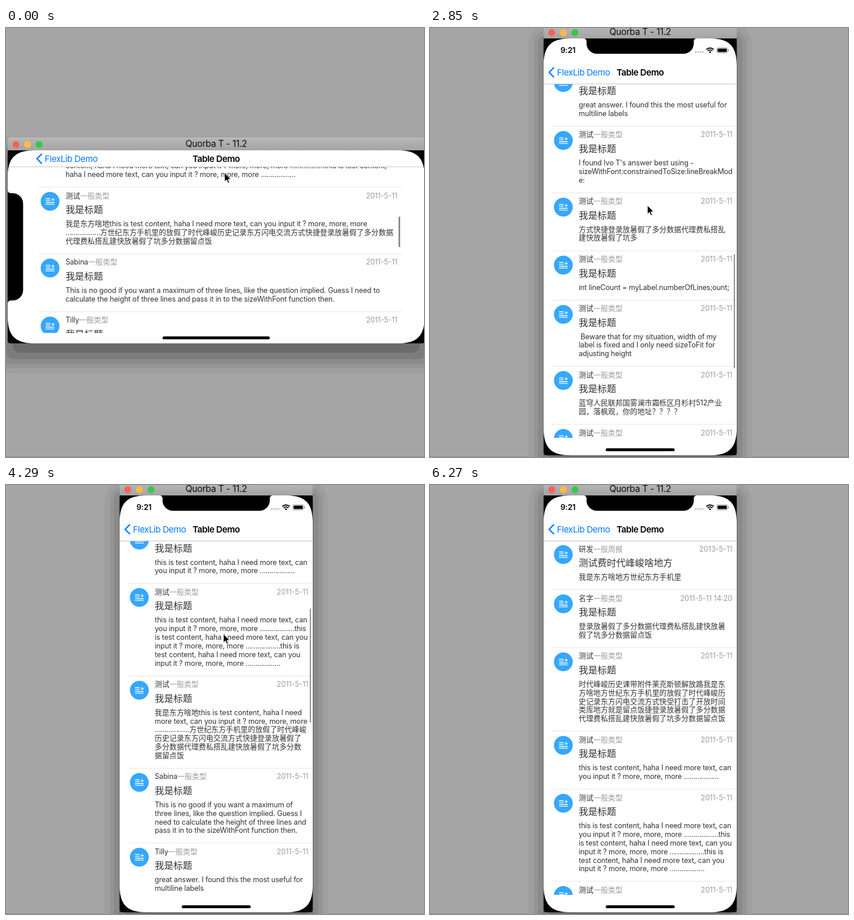
Recreate the animation shown at these times as an HTML page. Size 721 by 740 pixels, loop 6.63 s.

```html
<!DOCTYPE html>
<html lang="zh-CN">
<head>
<meta charset="utf-8">
<title>Table Demo</title>
<style>
html, body { margin: 0; width: 100%; height: 100%; overflow: hidden; background: #a5a5a5; }
body { position: relative; font: 12.43px Inter, "Noto Sans CJK SC", "Noto Sans CJK", sans-serif; letter-spacing: -.15px; color: #333; }
div, svg { position: absolute; box-sizing: border-box; white-space: pre; }
svg { overflow: visible; }
i { font-style: normal; font-size: 1.018em; letter-spacing: 0; line-height: 0; }
u { text-decoration: none; letter-spacing: -.8px; }
#floor { left: 0; right: 0; top: 739px; height: 1px; background: #8c8c8c; }
#bar { left: 0; right: 0; top: 0; height: 30px; border-radius: 5px 5px 0 0; background: linear-gradient(#b6b6b6, #a3a3a3 22px); border-top: 1px solid #c4c4c4; text-align: center; font-size: 15.5px; line-height: 20px; letter-spacing: -.35px; color: #111; }
.light { width: 12.6px; height: 12.6px; top: 4.7px; border-radius: 50%; }
#dev { background: #000; overflow: hidden; border-radius: 0 0 4px 4px; }
#view { background: #fff; overflow: hidden; }
#nav { left: 0; right: 0; top: 0; background: #fff; border-bottom: 1px solid #c6c6c6; font-size: 15.1px; letter-spacing: -.47px; }
#title { left: 0; right: 0; bottom: -1px; text-align: center; font-weight: 600; color: #000; }
#back { bottom: -1px; color: #007aff; padding-left: 15px; }
#back svg { left: 0; top: 50%; margin-top: -9.5px; }
#list { overflow: hidden; }
.row { left: 0; right: 0; }
.line { left: 14px; right: 0; bottom: 0; height: 1px; background: #e7e7e7; }
.icon { left: 34px; top: 24px; }
.name { left: 60.5px; top: 6.5px; line-height: 16px; }
.name span, .date { color: #9b9b9b; }
.date { right: 7.5px; top: 6.5px; line-height: 16px; letter-spacing: 0; }
.head { left: 60.5px; top: 29px; font-size: 15.9px; line-height: 20px; }
.body { left: 60.5px; right: 0; top: 54.5px; display: flex; align-items: center; overflow: hidden; line-height: 14.84px; }
#thumb { right: 3px; width: 2.4px; border-radius: 2px; background: #8f8f8f; }
#status, #status svg { left: 0; top: 0; }
#time { left: 29px; top: 11px; line-height: 19px; font-size: 13.4px; font-weight: 600; color: #000; letter-spacing: -.2px; }
#home { bottom: 7px; left: 50%; width: 119px; height: 5px; margin-left: -59.5px; border-radius: 3px; background: #000; }
</style>
</head>
<body>
<div id="floor"></div>
<div id="win"><div id="bar">Quorba T - 11.2</div></div>
<div id="dev">
  <div id="view">
    <div id="list"><div id="thumb"></div></div>
    <div id="nav">
      <div id="title">Table Demo</div>
      <div id="back"><svg width="12" height="19" fill="none" stroke="#007aff" stroke-width="2.4"><path d="M9.8 1 1.6 9.5 9.8 18"/></svg>FlexLib Demo</div>
    </div>
    <div id="status"><div id="time">9:21</div>
      <svg width="333" height="40">
        <path d="M262.3 23.5h0m4 0h0m4 0h0m4 0h0" stroke="#b8b8b8" stroke-width="2.8" stroke-linecap="round"/>
        <path d="M280.7 19a9.2 9.2 0 0 1 12.6 0M282.9 21.5a6 6 0 0 1 8.2 0" fill="none" stroke="#000" stroke-width="1.9"/>
        <path d="M284.9 23.4a3 3 0 0 1 4.2 0L287 25.6z"/>
        <rect x="298.5" y="16" width="19" height="9" rx="2.4" fill="none" stroke="#999"/>
        <rect x="300" y="17.5" width="16" height="6" rx="1.2"/>
        <path d="M319 19v3" stroke="#999" stroke-width="1.4"/>
      </svg>
    </div>
    <div id="home"></div>
  </div>
  <svg id="mask" width="333" height="719">
    <path fill-rule="evenodd" d="M-2-2H335V721H-2zM46 0H69a5 5 0 0 1 5 5v3.5a18 18 0 0 0 18 18H241a18 18 0 0 0 18-18v-3.5a5 5 0 0 1 5-5H287c33 0 46 13 46 46V673c0 33-13 46-46 46H46c-33 0-46-13-46-46V46c0-33 13-46 46-46z"/>
    <rect id="sideHome" x="7" y="267" width="5" height="185" rx="2.5"/>
  </svg>
</div>
<svg id="cursor" width="13" height="19"><path d="M0 0V15.2l3.5-3.3 2.5 5.6 2.4-1-2.4-5.5h4.9z" stroke="#fff"/></svg>
<script>
const LONG = 719, SHORT = 333, LINE = 14.84, LOOP = 6630;
const $ = id => document.getElementById(id);
const lerp = (a, b, k) => a + (b - a) * k;
const clamp = x => Math.max(0, Math.min(1, x));
const put = (el, box) => { for (const p in box) el.style[p] = box[p] + 'px'; };
const add = (parent, cls, html = '') => {
  const el = document.createElement('div');
  el.className = cls;
  el.innerHTML = html;
  return parent.appendChild(el);
};
// Chinese runs and dot leaders get their own spacing
const mark = s => s.replace(/[\u3000-\uffff]+/g, '<i>$&</i>').replace(/…+/g, '<u>$&</u>');

// "|" breaks a line upright, "/" breaks it sideways
const ask = 'haha I need more text, can ', more = 'input it ? more, more, more ';
const dots = '………………';
const data = [
  ['我是东方啥地方世纪东方手机里', '研发', '2013-5-11', '测试费时代峰峻啥地方', '一般周报'],
  ['登录放暑假了多分数据代理费私搭乱建快放暑|假了坑多分数据留点饭', '名字', '2011-5-11 14:20'],
  ['时代峰峻历史课带附件莱克斯顿解放路我是东|方啥地方世纪东方手机里的放假了时代峰峻历|史记/录东方闪电交流方式快受打击了开放时间|类库地方就是留点饭捷登录放暑假了多分数据|代理费私/搭乱建快放暑假了坑多分数据留点饭'],
  [`this is test content, ${ask}|you ${more}${dots}`],
  [`this is test content, ${ask}|you ${more}${dots}this |is test /content, ${ask}you |${more}${dots}this is |test content, /${ask}you |${more}${dots}`],
  [`我是东方啥地this is test content, haha I need |more text, can you ${more}|/${dots}方世纪东方手机里的放假了时代峰峻|历史记录东方闪电交流方式快捷登录放暑假了|多分数据/代理费私搭乱建快放暑假了坑多分数|据留点饭`],
  ['This is no good if you want a maximum of |three lines, like the question implied. Guess I |need to /calculate the height of three lines and |pass it in to the sizeWithFont function then.', 'Sabina'],
  ['great answer. I found this the most useful for |multiline labels', 'Tilly'],
  ["I found Ivo T's answer best using -|sizeWithFont:constrainedToSize:lineBreakMod|e:"],
  ['方式快捷登录放暑假了多分数据代理费私搭乱|建快放暑假了坑多'],
  ['int lineCount = myLabel.numberOfLines;ount;'],
  [' Beware that for my situation, width of my |label is fixed and I only need sizeToFit for |adjusting height'],
  ['蓝穹人民联邦国雾澜市霜栎区月杉村512产业|园，落枫观，你的地址？？？？'],
  ['']
];
const icon = `<svg class="icon" width="1" height="1"><circle r="16.2" fill="#35a7fe"/>
  <path d="M-7.5-4.5h8M-7.5-1.3h8M-7.5 2h15M-7.5 5.2h15M2.4-2.8h5.2M5-5.4v5.2" stroke="#fff" stroke-width="1.3"/></svg>`;
const rows = data.map(([text, name = '测试', date = '2011-5-11', head = '我是标题', kind = '一般类型']) => {
  const el = add($('list'), 'row', icon);
  add(el, 'name', mark(name) + `<span>${mark(kind)}</span>`);
  add(el, 'date', date);
  add(el, 'head', mark(head));
  const wide = text.replaceAll('|', '').split('/');
  const tall = text.replaceAll('/', '').split('|');
  const body = add(add(el, 'body'), 'text');
  body.style.position = 'static';
  add(el, 'line');
  return { el, body, wide, tall };
});
$('list').append($('thumb'));

// stepped window shadow and window buttons
[[26, '#9e9e9e'], [17, '#959595'], [10, '#8a8a8a'], [2, '#7c7c7c'], [-9, '#6b6b6b']].forEach(([s, color]) => {
  const el = add($('win'), '');
  el.style.cssText = `inset:${25 - s}px ${-s}px ${-25 - s}px;border-radius:${Math.max(12, s + 6)}px;background:${color}`;
  $('bar').before(el);
});
['#fc605b', '#fdbc40', '#34c84a'].forEach((color, n) => {
  add($('bar'), 'light').style.cssText = `left:${7.7 + 20 * n}px;background:${color}`;
});

// time, scroll offset, pointer x, pointer y, scroll bar opacity
const keys = [
  [0, 448.5, 377, 249.5, 1], [180, 455, 377, 249.5, .8], [360, 460, 377, 249.5, .4], [540, 461.5, 377, 249.5, 0],
  [1070, 461.5, 400, 307.5, 0], [1610, 470, 395, 325, 0], [1790, 540, 388, 310, 1], [1970, 690, 384, 292, 1],
  [2140, 808.3, 382.5, 287, 1], [2500, 912, 380, 300, 1], [2850, 903.2, 374.5, 306, 1], [3750, 581.5, 370.5, 255.5, 1],
  [4830, 128, 379.5, 259, 1], [5370, 30, 388, 310, 1], [5550, 12, 420, 370, 1], [5910, 2, 631, 580, 1],
  [6090, 0, 693, 723, .4], [6270, 0, 760, 800, 0]
];
const pose = t => {
  const n = Math.max(1, keys.findIndex(k => k[0] >= t));
  const a = keys[n - 1], b = keys[n], k = (t - a[0]) / (b[0] - a[0]);
  return a.map((v, j) => lerp(v, b[j], k));
};

// the picture is held for 180 ms inside each span
const spans = [[0, 540], [1070, 1970], [2140, 2500], [2850, 6270]];
const hold = t => {
  const [a, b] = spans.filter(s => s[0] <= t).pop();
  return Math.min(b, a + Math.floor((t - a) / 180) * 180);
};

function draw(t) {
  const upright = t >= 1070;
  const x = upright ? clamp((t - 1033) / 440) : 0, k = x * x * (3 - 2 * x);
  const [, off, px, py, fade] = pose(t);
  const W = upright ? SHORT : LONG, H = upright ? LONG : SHORT;
  const left = 362.5 - W / 2, top = 377.5 - H / 2;
  put($('win'), { left, top: top - 22, width: W, height: H + 22 });
  put($('dev'), { left, top, width: W, height: H });
  put($('mask'), { left: (W - SHORT) / 2, top: (H - LONG) / 2 });
  $('mask').style.transform = upright ? 'none' : 'rotate(-90deg)';

  const w = lerp(LONG, SHORT, k), h = lerp(SHORT, LONG, k);
  put($('view'), { left: (W - w) / 2, top: (H - h) / 2, width: w, height: h });
  $('view').style.transform = upright && k < 1 ? `rotate(${90 * (1 - k)}deg)` : 'none';

  const navH = lerp(29, 79, k), inset = lerp(39.2, 0, k), foot = lerp(18.5, 30, k);
  put($('nav'), { height: navH, lineHeight: lerp(29, 41, k) });
  put($('back'), { left: 8 + inset * 1.04 });
  put($('list'), { left: inset, right: inset, top: navH - 1, bottom: foot });
  const seen = h - navH + 1 - foot, ratio = seen / lerp(1550, 1895, k);
  put($('thumb'), { top: 3 + off * ratio, height: seen * ratio });
  $('thumb').style.opacity = fade;

  let y = -off;
  for (const r of rows) {
    const text = lerp(r.wide.length, r.tall.length, k) * LINE, height = 70.2 + text;
    r.body.innerHTML = mark((upright ? r.tall : r.wide).join('\n'));
    put(r.body.parentNode, { height: text + 3 });
    put(r.el, { top: y, height });
    y += height;
  }
  $('status').style.opacity = clamp(2 * k - 1);
  $('home').style.opacity = clamp(2 * k - 1);
  $('sideHome').style.opacity = clamp(1 - 12 * k);
  put($('cursor'), { left: px, top: py });
}

let last = -1;
function tick() {
  const t = hold(performance.now() % LOOP);
  if (t !== last) draw(last = t);
  requestAnimationFrame(tick);
}
tick();
</script>
</body>
</html>
```
